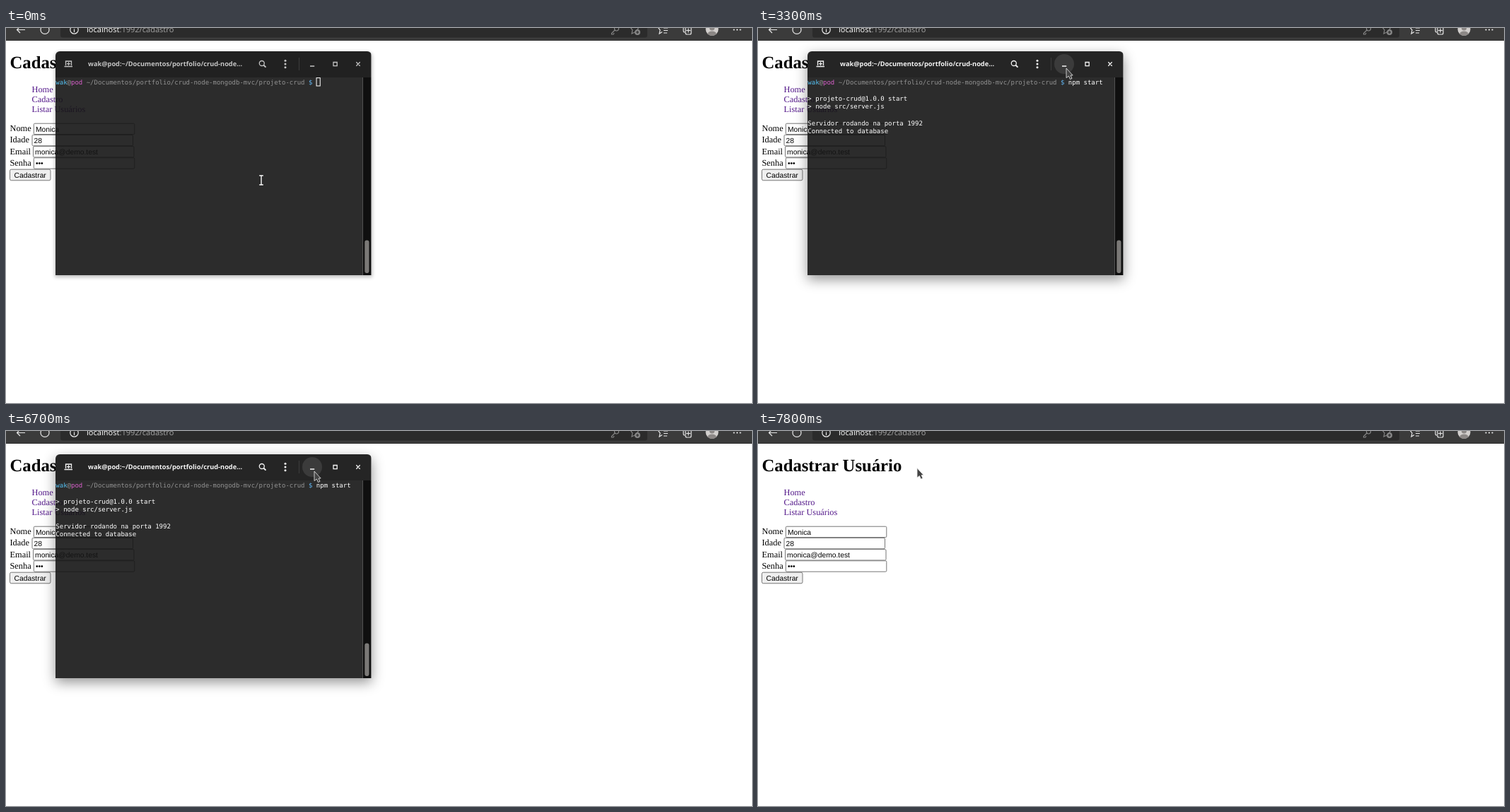
An HTML page that plays this animation: 1055 by 531 pixels, repeating every 8000 ms.

```html
<!DOCTYPE html>
<html lang="pt">
<head>
<meta charset="utf-8">
<title>Cadastrar Usuário</title>
<style>
  html, body { margin: 0; width: 100%; height: 100%; overflow: hidden; background: #fff; }
  svg { position: absolute; left: 0; top: 0; display: block; }
  text { white-space: pre; text-rendering: geometricPrecision; }
  .page { font: 12.36px "Liberation Serif", serif; }
  .control { font: 10.3px "Liberation Sans", sans-serif; }
  .box { fill: #fff; stroke: #767676; }
  .icon { fill: none; stroke: #e8e8e8; stroke-width: 1.2; }
  .dim { stroke: #858585; }
  #window {
    position: absolute; left: 70px; top: 33px; width: 446.5px; height: 317px;
    border-radius: 6px 6px 0 0; transform-origin: 0 0; color: #c4c4c4;
    box-shadow: 0 2px 5px 1px rgba(0, 0, 0, .25);
  }
  #window.focused { color: #f4f4f4; box-shadow: 0 6px 18px rgba(0, 0, 0, .42); }
  #window svg { border-radius: 6px 6px 0 0; overflow: hidden; }
  #header { fill: #212121; }
  .focused #header { fill: #252525; }
  #title { font: bold 9.25px "Noto Sans", sans-serif; fill: currentColor; }
  .terminal { font: 9px "DejaVu Sans Mono", monospace; fill: #fff; }
</style>
</head>
<body>
<svg width="1055" height="531" viewBox="0 0 1055 531">
  <rect width="1055" height="18" fill="#3b3b3b"/>
  <rect y="17" width="1055" height="1" fill="#303030"/>
  <rect x="77" y="-10" width="830" height="23.5" rx="3" fill="#2b2b2b"/>
  <g class="icon">
    <path d="M27 2.5H15.5M20 -2L15.5 2.5L20 7"/>
    <path d="M59 -2A6 6 0 1 1 51 -2"/>
    <circle cx="96.5" cy="2.5" r="5.7"/>
    <path d="M96.5 1.5V6M96.5 -1V.3"/>
    <path d="M922 -1H928M930 0H936M930 3.5H936M930 7H935M922 -1L925 3L924 8L928 5.5"/>
    <path d="M958 -2V4Q958 6 960 6M961 -2H967Q969 -2 969 0V7Q969 9 967 9H963Q961 9 961 7ZM965 .5V6.5M962 3.5H968"/>
  </g>
  <g class="icon dim">
    <circle cx="863.5" cy="1" r="3"/>
    <path d="M861 3L856.5 7.5V9H859L860 7M883 -1L886 3L885 8L889 6M890 -1H895L893 2"/>
    <circle cx="893" cy="6" r="3.4" fill="#858585"/>
    <path d="M893 4V8M891 6H895" style="stroke:#2b2b2b"/>
  </g>
  <clipPath id="avatar"><circle cx="998.5" cy="2" r="9"/></clipPath>
  <g clip-path="url(#avatar)">
    <rect x="989" y="-8" width="19" height="20" fill="#d2cfcd"/>
    <circle cx="998.5" cy="0" r="3.6" fill="#8c8886"/>
    <ellipse cx="998.5" cy="9" rx="6.5" ry="4.5" fill="#8c8886"/>
  </g>
  <g fill="#eee"><circle cx="1029.5" cy="2.5" r="1.1"/><circle cx="1034" cy="2.5" r="1.1"/><circle cx="1038.5" cy="2.5" r="1.1"/></g>
  <text x="114" y="6.3" font-family="Noto Sans, sans-serif" font-size="11" fill="#f0f0f0">localhost<tspan fill="#9c9c9c">:1992/cadastro</tspan></text>

  <g class="page">
    <text x="5.5" y="57" font-size="24.7" font-weight="bold">Cadastrar Usuário</text>
    <g fill="#551a8b">
      <text x="36.5" y="91.3">Home</text>
      <text x="36.5" y="105.2">Cadastro</text>
      <text x="36.5" y="119.1">Listar Usuários</text>
    </g>
  </g>
  <g id="form"></g>
  <rect class="box" x="5.5" y="200.2" width="57.5" height="15.6" rx="2" style="fill:#efefef"/>
  <text class="control" x="11.6" y="211.6">Cadastrar</text>
</svg>

<div id="window">
<svg width="446.5" height="317" viewBox="70 33 446.5 317">
  <rect id="header" x="70" y="33" width="446.5" height="37"/>
  <rect x="70" y="70" width="434.5" height="280" fill="#141414" fill-opacity=".895"/>
  <rect x="504.5" y="70" width="12" height="280" fill="#0f0f0f"/>
  <rect x="507.3" y="300.5" width="6.2" height="46.5" rx="3.1" fill="#7b7977"/>
  <circle id="hover" cx="433" cy="51" r="14" fill="#3b3b3b"/>
  <text id="title" x="116" y="54">wak@pod:~/Documentos/portfolio/crud-node…</text>
  <g fill="none" stroke="currentColor" stroke-width="1.3">
    <path d="M84.5 53V47H92.5V53M82.5 54.5H94M88.5 48.2V53M86 50.6H91"/>
    <circle cx="361.8" cy="50" r="3.5"/>
    <path d="M364.3 52.5L367.5 55.7" stroke-width="1.8"/>
    <path d="M430 54H436.2M463 48.5H468.2V53.7H463ZM495.3 48.3L500.7 53.7M500.7 48.3L495.3 53.7"/>
    <path d="M414.5 42V60" stroke="#3c3c3c" stroke-width="1"/>
  </g>
  <g fill="currentColor"><circle cx="395" cy="46.3" r="1.5"/><circle cx="395" cy="51" r="1.5"/><circle cx="395" cy="55.7" r="1.5"/></g>
  <g class="terminal" id="lines">
    <text x="70.3" y="79.6"><tspan fill="#55bff0">wak</tspan><tspan fill="#999">@</tspan><tspan fill="#d95fcb">pod</tspan><tspan fill="#929292"> ~/Documentos/portfolio/crud-node-mongodb-mvc/projeto-crud</tspan><tspan fill="#62b4f0"> $</tspan></text>
  </g>
  <rect id="caret" width="5.2" height="11.4" stroke="#fff"/>
</svg>
</div>

<svg width="1055" height="531" viewBox="0 0 1055 531">
  <g id="mouse">
    <path id="arrow" d="M0 0V13.6L3.4 11L5.4 15.6L8 14.4L6.1 10H9.2Z" fill="#444" stroke="#eee" stroke-width=".8"/>
    <g id="beam" fill="none">
      <path d="M-2.8 -6.5H2.8M0 -6.5V6.5M-2.8 6.5H2.8" stroke="#222" stroke-width="3"/>
      <path d="M-2.8 -6.5H2.8M0 -6.5V6.5M-2.8 6.5H2.8" stroke="#fff" stroke-width="1.4"/>
    </g>
  </g>
</svg>

<script>
const LOOP = 8000, ROW = 11.6, CELL = 5.42;
const $ = id => document.getElementById(id);
const show = (node, on) => { node.style.display = on ? '' : 'none'; };

$('form').innerHTML = [
  ['Nome', 39.3, 'Monica'], ['Idade', 37, '28'], ['Email', 38.5, 'monica@demo.test'], ['Senha', 39.3, '•••']
].map(([label, x, value], i) => {
  const y = 135.2 + i * 16.2;
  return `<text class="page" x="5.5" y="${y + 11}">${label}</text>
    <rect class="box" x="${x}" y="${y}" width="142.5" height="15.4" rx="1.5"/>
    <text class="control" x="${x + 2.6}" y="${y + 11.4}">${value}</text>`;
}).join('');

// [time shown, row, column, text]
const output = [
  [1500, 0, 68, 'npm start'],
  [2900, 2, 0, '> projeto-crud@1.0.0 start'],
  [2900, 3, 0, '> node src/server.js'],
  [3100, 5, 0, 'Servidor rodando na porta 1992'],
  [3300, 6, 0, 'Connected to database']
].map(([from, row, column, content]) => {
  const node = document.createElementNS('http://www.w3.org/2000/svg', 'text');
  node.setAttribute('x', 70.3 + column * CELL);
  node.setAttribute('y', 79.6 + row * ROW);
  node.textContent = content;
  $('lines').append(node);
  return { from, node };
});

// [time, x, y]: pointer positions, each held until the next; no position means hidden
const pointerPath = [
  [0, 361, 215.5], [500, 372, 205], [600, 395, 182], [800, 427, 150], [900, 448, 129], [1100, 455, 122],
  [1500],
  [3300, 436, 57], [3500, 395, 95], [3700, 290, 148], [3900, 228, 160], [4100, 223.5, 163],
  [4300, 228, 172], [4400, 262, 178], [4600, 350, 145], [4700, 420, 100], [4900, 446, 82],
  [5200, 445, 79], [5400, 443, 75], [5700, 441, 73],
  [6000, 439, 65], [6300, 437, 60], [6500, 436, 57],
  [7100, 425, 66], [7300, 365, 74], [7400, 300, 68], [7600, 245, 57], [7800, 225, 52.5]
];

// [time, row, column]
const caretPath = [[0, 0, 68], [1500, 0, 77], [2400, 1, 0], [2900, 4, 0], [3100, 6, 0], [3300, 7, 0]];

const latest = (path, t) => path.findLast(([time]) => time <= t);

function drawCaret(t) {
  const [, row, column] = latest(caretPath, t);
  const lit = t < 2100 || (t >= 2400 && t < 3100) || (t >= 3700 && (t - 3700) % 1200 < 600);
  const caret = $('caret');
  show(caret, lit);
  caret.setAttribute('x', 70.5 + column * CELL);
  caret.setAttribute('y', 70.6 + row * ROW);
  caret.setAttribute('fill', t < 1100 ? 'none' : '#fff');
  caret.setAttribute('stroke-width', t < 1100 ? 1 : 0);
}

function drawPointer(t) {
  const [, x, y] = latest(pointerPath, t);
  const visible = x !== undefined;
  const isArrow = y < 70 || t >= 6800;
  show($('mouse'), visible);
  show($('arrow'), isArrow);
  show($('beam'), !isArrow);
  show($('hover'), visible && t < 6800 && x > 419 && y < 65);
  if (visible) $('mouse').setAttribute('transform', `translate(${x} ${y})`);
}

function draw(t) {
  const win = $('window');
  win.classList.toggle('focused', t >= 1200);
  show(win, t < 7100);
  win.style.transform = t >= 6800 ? 'translate(-38px, -51px) scale(.466)' : 'none';
  for (const { from, node } of output) show(node, t >= from);
  drawCaret(t);
  drawPointer(t);
}

const start = performance.now();
function tick() {
  draw((performance.now() - start) % LOOP);
  requestAnimationFrame(tick);
}
tick();
</script>
</body>
</html>
```
